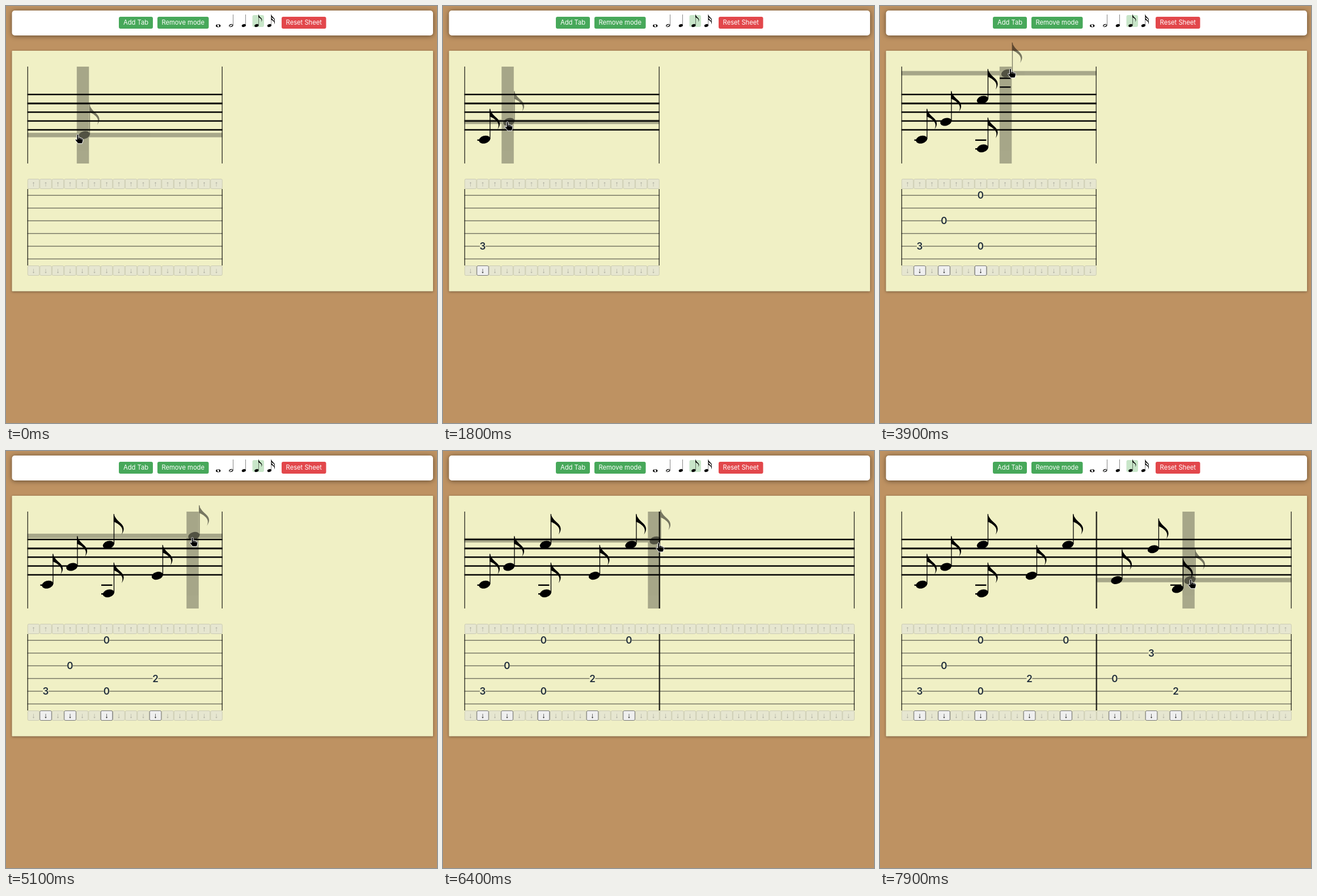
An HTML page for the animation above (8 s loop, 760 by 736 pixels).

```html
<!DOCTYPE html>
<html lang="en">
<head>
<meta charset="utf-8">
<title>Tab editor</title>
<style>
html, body { margin: 0; width: 100%; height: 100%; overflow: hidden; background: #be9262; }
svg { display: block; width: 760px; height: 736px; }
.header { filter: drop-shadow(0 1px 4px rgba(0, 0, 0, .5)); }
.sheet { filter: drop-shadow(0 1px 2px rgba(0, 0, 0, .4)); }
.label { font: 11.2px Inter, sans-serif; fill: #fff; text-anchor: middle; }
.arrow { font: 13px "Liberation Sans", sans-serif; text-anchor: middle; }
.fret { font: 600 17px Inter, sans-serif; fill: #222f3d; text-anchor: middle; }
</style>
</head>
<body>
<svg id="stage" viewBox="0 0 760 736">
  <defs>
    <path id="flag" d="M9-55C11-48 16-43 21-38.5C27-33 29.5-27 23-18C25.5-24 25-28.5 21.5-32.5C18-36.5 12-40 9-40.5Z"/>
    <path id="stem" d="M9-54H10.3V-1H9Z"/>
    <ellipse id="head" rx="10.2" ry="6.7" transform="rotate(-16)"/>
    <g id="quarter"><use href="#head"/><use href="#stem"/></g>
    <g id="eighth"><use href="#quarter"/><use href="#flag"/></g>
  </defs>
  <rect class="header" x="10.5" y="8" width="742.5" height="44" rx="5" fill="#fff"/>
  <rect class="sheet" x="10.5" y="79" width="742.5" height="424.5" rx="1" fill="#f0f0c5"/>
  <g id="toolbar">
    <rect x="434.5" y="16" width="20.5" height="21" rx="3" fill="#c8e6c9"/>
    <g transform="translate(374.2 34.8) scale(.38)">
      <ellipse rx="11" ry="7"/><ellipse rx="4" ry="6" fill="#fff" transform="rotate(-25)"/>
    </g>
    <g transform="translate(396.8 34.5) scale(.36)">
      <use href="#quarter"/><ellipse rx="8.5" ry="3" fill="#fff" transform="rotate(-28)"/>
    </g>
    <use href="#quarter" transform="translate(419.3 34.5) scale(.36)"/>
    <use href="#eighth" transform="translate(441.8 34.5) scale(.36)"/>
    <g transform="translate(464.4 34.5) scale(.36)"><use href="#eighth"/><use href="#flag" y="13"/></g>
  </g>
  <g id="hover" opacity=".3"><rect id="colBar" y="107" width="21.5" height="171"/><rect id="rowBar" width="344" height="7.8"/></g>
  <g id="bars"></g>
  <g id="ghost"><use id="ghostNote" href="#eighth" opacity=".5"/><path id="ghostLedger" stroke="#000" stroke-width="2.4"/></g>
  <g id="notes"></g>
  <g id="hand" stroke="#fff">
    <path stroke-linejoin="round" d="M-2 1.4C-2-1 1-1 1 1.4V5C2 4 4 4.4 4 5.8C5 5 6.6 5.5 6.6 7C7.6 6.4 8.8 7 8.8 8.4V10.5C8.8 13 7.4 13.4 7.4 15.8H-.5C-.8 13.4-3.5 12-4.7 9.6C-5.2 8-3.8 7.4-2 9.2Z"/>
    <path fill="none" stroke-width=".7" d="M1 5V8M4 6V8.6M6.6 7V9"/>
  </g>
</svg>
<script>
const LOOP = 8000, STEP = 100, HOVER_LAG = 15;
const LEFT = 37.7, TOP = 106.9, BAR = 344, COLS = 16, ROWS = 22;
const COL = BAR / COLS, ROW = 7.8;

// Semitones above middle C
const OPEN_STRINGS = [16, 11, 7, 2, -3, -8];
const SCALE = [0, 2, 4, 5, 7, 9, 11];
const MIDDLE_C_ROW = 16;

const $ = id => document.getElementById(id);
const set = (node, attrs) => {
  for (const key in attrs) node.setAttribute(key, attrs[key]);
  return node;
};
const add = (parent, tag, attrs, text = '') => {
  const node = set(document.createElementNS('http://www.w3.org/2000/svg', tag), attrs);
  node.textContent = text;
  return parent.appendChild(node);
};
const show = (node, on) => node.setAttribute('visibility', on ? 'visible' : 'hidden');

const colX = col => LEFT + 1.1 + col * COL;
const rowY = row => TOP + row * ROW;
const midY = row => rowY(row + .5);
const stringY = s => 334.2 + s * 22.45;
const noteAt = (col, row) => `translate(${colX(col) + 13} ${midY(row) + .1})`;

function fingering(row) {
  const step = MIDDLE_C_ROW - row, octave = Math.floor(step / 7);
  const pitch = 12 * octave + SCALE[step - 7 * octave];
  const string = OPEN_STRINGS.findIndex(open => open <= pitch);
  return { string, fret: pitch - OPEN_STRINGS[string] };
}

function ledgerPath(col, row) {
  let d = '';
  const line = r => d += `M${colX(col) + .2} ${midY(r) + 1.1}h19.4`;
  for (let r = 16; r <= row; r += 2) line(r);
  for (let r = 4; r >= row; r -= 2) line(r);
  return d;
}

function toolButton(x, width, color, text) {
  add($('toolbar'), 'rect', { x, y: 19, width, height: 21, rx: 3, fill: color });
  add($('toolbar'), 'text', { class: 'label', x: x + width / 2, y: 33.2 }, text);
}

function arrowButton(parent, col, y, glyph, active) {
  const x = LEFT + col * COL;
  add(parent, 'rect', {
    x: x + .6, y: y + .5, width: COL - 1, height: 17, rx: 2,
    fill: active ? '#efefef' : '#e6e6d0', stroke: active ? '#767676' : '#cbcbb4'
  });
  add(parent, 'text', {
    class: 'arrow', x: x + COL / 2, y: y + 12.6, fill: active ? '#000' : '#a5a598'
  }, glyph);
}

function drawBar(index) {
  const g = add($('bars'), 'g', {});
  const x = LEFT + index * BAR;
  for (let i = 0; i < 5; i++) {
    add(g, 'rect', { x, y: midY(6 + 2 * i) - 2.7, width: BAR, height: i === 1 ? 3 : 2.5 });
  }
  OPEN_STRINGS.forEach((_, s) =>
    add(g, 'rect', { x, y: stringY(s) - .7, width: BAR, height: 1.4, fill: '#70705f' }));
  for (const edge of [x, x + BAR - 1.1]) {
    add(g, 'rect', { x: edge, y: TOP, width: 1.1, height: 171 });
    add(g, 'rect', { x: edge, y: 323, width: 1.1, height: 135 });
  }
  for (let i = 0; i < COLS; i++) {
    arrowButton(g, index * COLS + i, 305, '↑', false);
    arrowButton(g, index * COLS + i, 458, '↓', false);
  }
  return g;
}

function drawNote(col, row) {
  const g = add($('notes'), 'g', {});
  const { string, fret } = fingering(row);
  const x = LEFT + (col + .5) * COL, y = stringY(string);
  add(g, 'path', { d: ledgerPath(col, row), stroke: '#000', 'stroke-width': 2.4 });
  add(g, 'use', { href: '#eighth', transform: noteAt(col, row) });
  add(g, 'rect', { x: x - 5, y: y - 6, width: 10, height: 12, fill: '#f0f0c5' });
  add(g, 'text', { class: 'fret', x, y: y + 6 }, fret);
  arrowButton(g, col, 458, '↓', true);
  return g;
}

toolButton(199, 60, '#47a85a', 'Add Tab');
toolButton(267, 90.5, '#47a85a', 'Remove mode');
toolButton(486, 78.5, '#e2474b', 'Reset Sheet');
const bars = [drawBar(0), drawBar(1)];

// The pointer lives in staff units: fractional column and row.
const pointer = { time: 0, col: 4.1, row: 15.4 };
const moves = [], reveals = [];

function glide(duration, col, row) {
  moves.push({ start: pointer.time, duration, from: [pointer.col, pointer.row], to: [col, row] });
  Object.assign(pointer, { time: pointer.time + duration, col, row });
}
function reveal(wait, node) {
  pointer.time += wait;
  reveals.push({ after: pointer.time, node });
}
const place = wait => reveal(wait, drawNote(Math.floor(pointer.col), Math.floor(pointer.row)));

glide(700, 1.5, 16.8);
place(600);
glide(500, 3.5, 12.5);
place(200);
glide(300, 6.2, 7.9);
place(400);
glide(800, 6.3, 18.5);
place(100);
glide(400, 9.4, -2.8);
glide(500, 10.5, 14.5);
place(200);
glide(400, 13.5, 5.9);
glide(100, 13.5, 7.5);
place(100);
glide(400, 8.8, -9.7);
reveal(100, bars[1]);
glide(400, 14.8, -1.2);
glide(200, 15.9, 7.1);
glide(400, 17.6, 15.5);
place(100);
glide(400, 20.5, 8.5);
place(100);
glide(300, 22.6, 17.5);
place(100);
glide(100, 23.7, 15.4);

function pointerAt(t) {
  const move = moves.findLast(m => m.start <= t) || moves[0];
  const u = Math.min(1, Math.max(0, (t - move.start) / move.duration));
  const eased = u * u * (3 - 2 * u);
  return move.from.map((v, i) => v + (move.to[i] - v) * eased);
}

function drawHover(t) {
  const [col, row] = pointerAt(t - HOVER_LAG).map(Math.floor);
  const barCount = bars[1].getAttribute('visibility') === 'visible' ? 2 : 1;
  const inside = col >= 0 && col < COLS * barCount && row >= 0 && row < ROWS;
  show($('hover'), inside);
  show($('ghost'), inside);
  if (!inside) return;
  set($('colBar'), { x: colX(col) });
  set($('rowBar'), { x: LEFT + Math.floor(col / COLS) * BAR, y: rowY(row) });
  set($('ghostNote'), { transform: noteAt(col, row) });
  set($('ghostLedger'), { d: ledgerPath(col, row) });
}

function render(now) {
  const t = Math.floor(now % LOOP / STEP) * STEP;
  reveals.forEach(({ after, node }) => show(node, t > after));
  drawHover(t);
  const [col, row] = pointerAt(t);
  set($('hand'), { transform: `translate(${colX(col)} ${rowY(row)})` });
}

const start = performance.now();
function tick() {
  render(performance.now() - start);
  requestAnimationFrame(tick);
}
tick();
</script>
</body>
</html>
```
